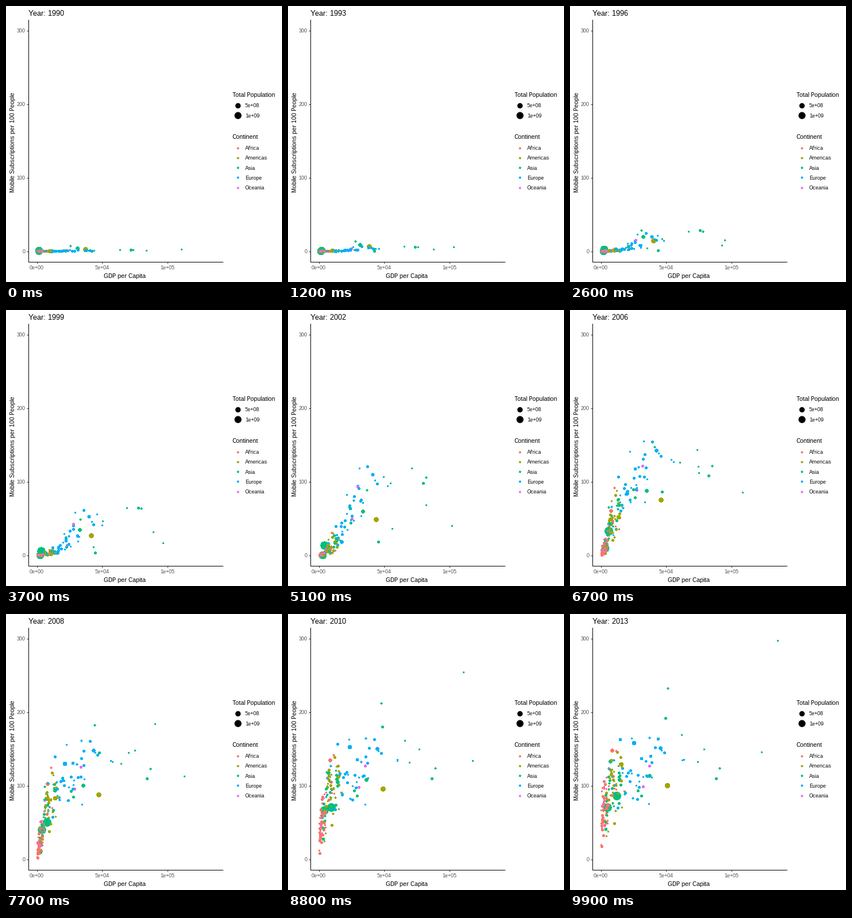
Animation of 480x480 px, one loop 10000 ms. Source, as a matplotlib script:

```python
import numpy as np
import matplotlib.pyplot as plt
from matplotlib.animation import FuncAnimation
from matplotlib.colors import to_rgb

plt.rcParams["font.family"] = ["Liberation Sans", "DejaVu Sans"]
plt.rcParams["text.hinting"] = "native"
plt.rcParams["text.hinting_factor"] = 1

FRAMES, SIZE = 100, 480
FIRST, LAST = 1990, 2013
LEFT, RIGHT, TOP, BOTTOM = 39, 377, 24, 445   # panel, in pixels
X0, X_SCALE = 53.5, 2.275                     # pixels per 1000 of GDP
Y0, Y_SCALE = 426.5, -1.28                    # pixels per subscription
COLORS = {"Africa": "#F8766D", "Americas": "#A3A500", "Asia": "#00BF7D",
          "Europe": "#00B0F6", "Oceania": "#E76BF3"}

# Landmarks: population (millions), first and last GDP (thousands),
# subscription ceiling, year of half growth, growth width in years
LANDMARKS = [
    ("Asia", 1360, 1.6, 12.1, 107, 2008.3, 3.3),
    ("Asia", 1250, 1.7, 5.2, 71, 2007.6, 1.1),
    ("Americas", 315, 37.2, 51.2, 104, 2002.3, 3.4),
    ("Americas", 200, 10, 15.7, 142, 2007, 2.6),
    ("Africa", 173, 3, 5.3, 76, 2007.8, 1.5),
    ("Europe", 143, 12, 25.7, 160, 2005.4, 1.7),
    ("Asia", 127, 31, 37.2, 118, 2001.8, 3.6),
    ("Asia", 28, 42, 49.6, 195, 2006, 1.8),
    ("Asia", 7, 26, 51.6, 260, 2004.5, 4),
    ("Asia", 5, 110.7, 62, 175, 2003.2, 3),
    ("Asia", 1.5, 84, 122.9, 155, 2005, 3),
    ("Asia", 0.6, 22, 135.6, 330, 2007.3, 2.6),
]

# Crowd: count, median GDP, log spread of GDP, median population
CROWD = [
    ("Africa", 48, 2.2, 0.85, 9), ("Americas", 33, 11, 0.45, 6),
    ("Asia", 30, 7, 0.75, 16), ("Asia", 4, 75, 0.12, 2),
    ("Europe", 22, 20, 0.35, 7), ("Europe", 14, 38, 0.14, 18),
    ("Europe", 3, 60, 0.25, 2),
    ("Oceania", 6, 4, 0.4, 0.3), ("Oceania", 2, 38, 0.12, 10),
]


def invent(rng, gdp, spread, pop):
    """Richer countries take up phones earlier and reach a higher ceiling."""
    end = gdp * np.exp(spread * np.clip(rng.normal(), -2, 2))
    start = end * rng.uniform(0.5, 0.9)
    wealth = np.clip(np.log10(end / 2), -0.4, 1.35)
    mid = 2009.6 - 2.5 * wealth - 3.6 * wealth ** 2 + rng.normal(0, 0.7)
    cap = np.clip(rng.normal(72 + 42 * wealth, 24), 20, 165)
    people = np.clip(pop * np.exp(rng.normal(0, 1.1)), 0.1, 90)
    return people, start, end, cap, mid, 1.2 + cap / 180


def diameter(pop):
    return 2.3 + 11.6 * np.sqrt(pop / 1360)


def pixel(v):
    """Centre of the pixel that holds v."""
    return np.floor(v) + 0.5


rng = np.random.default_rng(4)
countries = LANDMARKS + [(name, *invent(rng, *spec))
                         for name, count, *spec in CROWD
                         for _ in range(count)]
countries.sort(key=lambda c: -c[1])
POP, START, END, CAP, MID, WIDTH = np.array([c[1:] for c in countries]).T
FILL = [to_rgb(COLORS[c[0]]) for c in countries]

fig = plt.figure(figsize=(SIZE / 72, SIZE / 72), dpi=72, facecolor="white")
ax = fig.add_axes([LEFT / SIZE, 1 - BOTTOM / SIZE,
                   (RIGHT - LEFT) / SIZE, (BOTTOM - TOP) / SIZE])
ax.set_xlim((LEFT - X0) / X_SCALE, (RIGHT - X0) / X_SCALE)
ax.set_ylim((BOTTOM - Y0) / Y_SCALE, (TOP - Y0) / Y_SCALE)
ax.set_xticks([0, 50, 100], ["0e+00", "5e+04", "1e+05"])
ax.set_yticks([0, 100, 200, 300])
ax.tick_params(length=3, width=1, color="#333333", labelcolor="#4D4D4D",
               labelsize=9, pad=2.5)
ax.spines[["top", "right"]].set_visible(False)
ax.spines[["left", "bottom"]].set_linewidth(1)

# Overlay in pixel coordinates for text, legend and dots
page = fig.add_axes([0, 0, 1, 1], facecolor="none")
page.set(xlim=(0, SIZE), ylim=(SIZE, 0))
page.axis("off")


def label(x, y, text, size=11, **kw):
    return page.text(x, y, text, fontsize=size, **kw)


def dots(x, y, d, color):
    return page.scatter(pixel(x), pixel(y), s=np.square(d), c=color,
                        linewidths=0, antialiased=False)


def key(y, d, color, text):
    dots(np.array([402]), np.array([y]), [d], [color])
    label(416, y + 4, text, 9)


title = label(39, 17, "", 13)
label(207, 473, "GDP per Capita", ha="center")
label(12, 236.5, "Mobile Subscriptions per 100 People", rotation=90,
      ha="center", va="center")
label(394, 158, "Total Population")
key(172.5, diameter(500), "black", "5e+08")
key(189.5, diameter(1000), "black", "1e+09")
label(394, 231, "Continent")
for i, (name, color) in enumerate(COLORS.items()):
    key(246 + 17.28 * i, 4, color, name)


def place(t):
    gdp = START * (END / START) ** t
    year = FIRST + t * (LAST - FIRST)
    subs = CAP / (1 + np.exp((MID - year) / WIDTH))
    return X0 + X_SCALE * gdp, Y0 + Y_SCALE * subs


points = dots(*place(0), diameter(POP), FILL)


def draw(frame):
    t = frame / (FRAMES - 1)
    points.set_offsets(pixel(np.column_stack(place(t))))
    points.set_sizes(diameter(POP * (0.8 + 0.2 * t)) ** 2)
    title.set_text(f"Year: {FIRST + round(t * (LAST - FIRST))}")
    return points, title


anim = FuncAnimation(fig, draw, frames=FRAMES, interval=100, repeat=True,
                     repeat_delay=0, blit=False)
plt.show()
```
